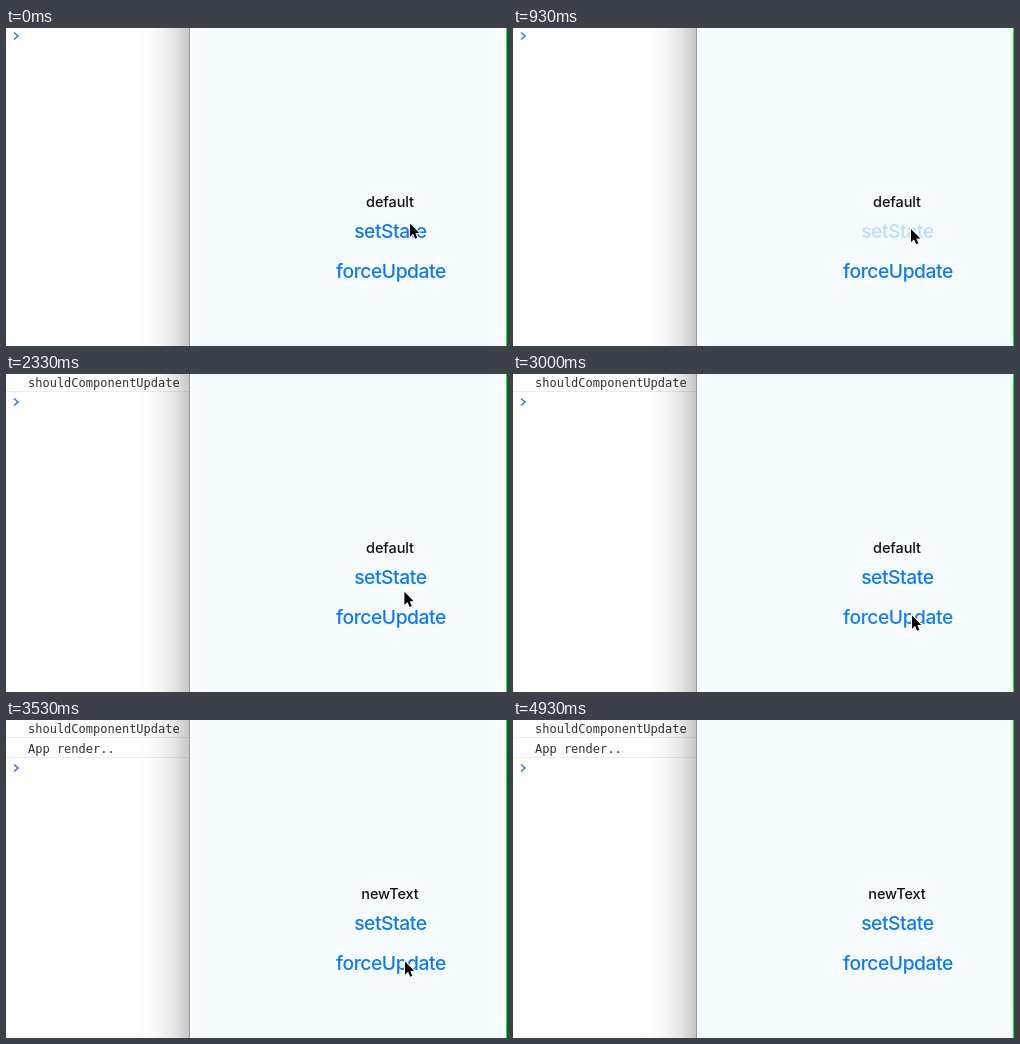
Recreate the animation shown at these times as an HTML page. Size 501 by 318 pixels, loop 4990 ms.

```html
<!DOCTYPE html>
<html lang="en">
<head>
<meta charset="utf-8">
<title>setState and forceUpdate</title>
<style>
  html, body { margin: 0; width: 100%; height: 100%; overflow: hidden; background: #fff; }
  svg { display: block; }
  .log { font: 12px "DejaVu Sans Mono", monospace; fill: #303030; }
  .app { font: 450 14.5px Inter, sans-serif; letter-spacing: -.1px; text-anchor: middle; fill: #111; }
  .button { font-size: 19.3px; letter-spacing: -.45px; fill: #107be6; }
</style>
</head>
<body>
<svg width="501" height="318" viewBox="0 0 501 318">
  <defs>
    <linearGradient id="shade">
      <stop offset="0" stop-opacity="0"/>
      <stop offset=".35" stop-opacity=".03"/>
      <stop offset=".7" stop-opacity=".1"/>
      <stop offset="1" stop-opacity=".22"/>
    </linearGradient>
  </defs>
  <g class="log">
    <g id="log1"><text x="22" y="13">shouldComponentUpdate</text><path d="M0 17.5H183" stroke="#ececec"/></g>
    <g id="log2"><text x="22" y="33">App render..</text><path d="M0 37.5H183" stroke="#ececec"/></g>
  </g>
  <path id="prompt" d="M8 4.5 12 8 8 11.5" fill="none" stroke="#3879d9" stroke-width="1.6"/>
  <rect x="133" width="50" height="318" fill="url(#shade)"/>
  <rect x="183" width="1" height="318" fill="#999"/>
  <rect x="184" width="316" height="318" fill="#f5fbff"/>
  <rect x="500" width="1" height="318" fill="#0f0"/>
  <g class="app">
    <text id="label" x="384" y="178.7"></text>
    <text id="set" class="button" x="384.4" y="210.2">setState</text>
    <text id="force" class="button" x="385" y="250.4">forceUpdate</text>
  </g>
  <path id="cursor" d="M.5 1V14.2L3.6 11.3 5.7 16.2 7.8 15.3 5.8 10.5H9.8Z" stroke="#fff" stroke-width="2" paint-order="stroke"/>
</svg>
<script>
const $ = id => document.getElementById(id);
const LOOP = 4990, FPS = 15;
const FIRST_PRESS = 11, SECOND_PRESS = 45, PRESS_STEPS = 8, EXIT = 65;

// Eased progress from 0 to 1 between two steps
function progress(step, from, to) {
  const u = Math.min(1, Math.max(0, (step - from) / (to - from)));
  return 1 - (1 - u) ** 1.5;
}

function pointer(step) {
  const toSet = progress(step, 0, 7);
  const toForce = progress(step, 32, 42);
  const leave = progress(step, 62, 64);
  const lift = 11 * Math.sin(Math.PI * toSet);
  return [
    403.5 - 6 * toSet + toForce + 80 * leave,
    194.5 + 5.5 * toSet - lift + 40.5 * toForce - 51.5 * leave
  ];
}

function pressOpacity(step, start) {
  const u = (step - start + .5) / PRESS_STEPS;
  return u > 0 && u < 1 ? 1 - .8 * Math.sin(Math.PI * u) ** 2 : 1;
}

const show = (id, on) => $(id).setAttribute("visibility", on ? "visible" : "hidden");
const moveTo = (id, x, y) => $(id).setAttribute("transform", `translate(${x} ${y})`);

function draw(now) {
  const step = Math.floor((now % LOOP + 3.4) * FPS / 1000);
  const logged = step >= FIRST_PRESS + PRESS_STEPS / 2;
  const updated = step >= SECOND_PRESS + PRESS_STEPS / 2;
  show("log1", logged);
  show("log2", updated);
  moveTo("prompt", 0, 20 * (logged + updated));
  $("label").textContent = updated ? "newText" : "default";
  $("set").setAttribute("opacity", pressOpacity(step, FIRST_PRESS));
  $("force").setAttribute("opacity", pressOpacity(step, SECOND_PRESS));
  show("cursor", step < EXIT);
  moveTo("cursor", ...pointer(step));
}

const start = performance.now();
function tick() {
  draw(performance.now() - start);
  requestAnimationFrame(tick);
}
tick();
</script>
</body>
</html>
```
